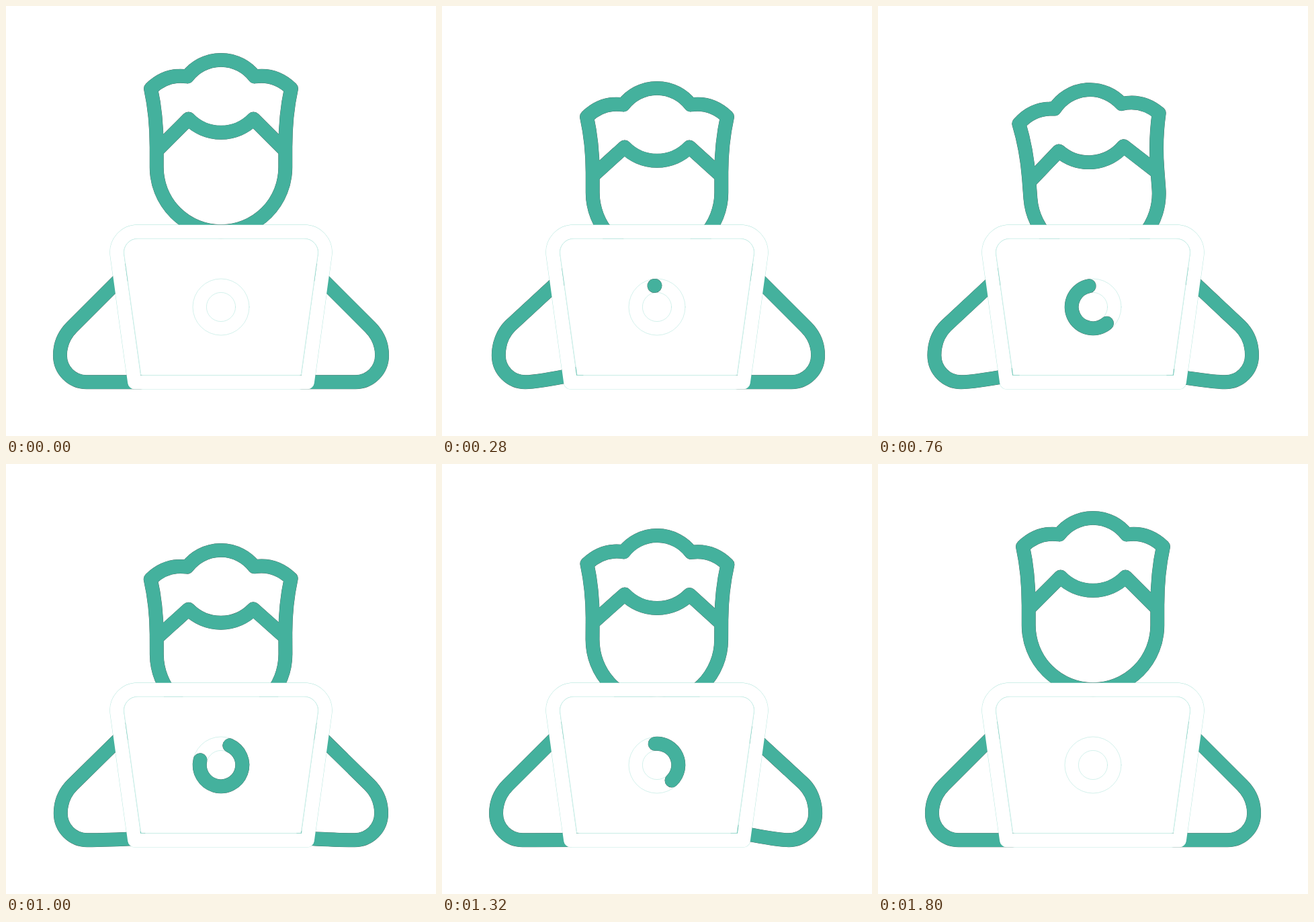
Write an HTML page that moves like this. It is 640 px wide and 640 px high and loops after 2000 ms.

```html
<!DOCTYPE html>
<html lang="en">
<head>
<meta charset="utf-8">
<title>Typing at a laptop</title>
<style>
  html, body { margin: 0; width: 100%; height: 100%; overflow: hidden; background: #fff; }
  svg { display: block; width: 100%; height: 100%; }
  path, circle { fill: none; stroke-linecap: round; stroke-linejoin: round; }
  .edge { stroke: #4b5c58; stroke-width: 20.9; }
  .line { stroke: #44b19d; stroke-width: 20.4; }
  .hair { stroke: #a9e2d8; stroke-width: 21.1; }
  .thin { stroke: #a9e2d8; stroke-width: .5; }
  .cover { fill: #fff; stroke: #fff; stroke-width: 20.3; }
  .inner { fill: #fff; stroke: #a9e2d8; stroke-width: .5; stroke-linejoin: miter; }
</style>
</head>
<body>
<svg viewBox="0 0 640 640">
  <defs>
    <path id="case" d="M191.3 560L165.3 371.2A31 31 0 0 1 196 335.8H444A31 31 0 0 1 474.7 371.2L448.7 560Z"/>
    <path id="head"/>
    <path id="left"/>
    <path id="right"/>
    <path id="arc"/>
  </defs>
  <use href="#case" class="hair"/>
  <g id="skull">
    <use href="#head" class="edge"/>
    <use href="#head" class="line"/>
  </g>
  <use href="#left" class="edge"/>
  <use href="#left" class="line"/>
  <g transform="matrix(-1 0 0 1 640 0)">
    <use href="#right" class="edge"/>
    <use href="#right" class="line"/>
  </g>
  <use href="#case" class="cover"/>
  <path class="inner" d="M201 549.3L175.7 369.5A20.5 20.5 0 0 1 196 346.3H444A20.5 20.5 0 0 1 464.3 369.5L439 549.3Z"/>
  <circle class="thin" cx="320" cy="448" r="42"/>
  <circle class="thin" cx="320" cy="448" r="21.6"/>
  <use href="#arc" class="edge"/>
  <use href="#arc" class="line"/>
</svg>
<script>
  const LOOP = 2000, STEP = 40, LAST = 1800;
  const $ = id => document.getElementById(id);

  // Each key is [time, value, ease-out strength].
  const tracks = {
    drop: [[40, 0], [280, 42], [600, 42], [1000, 48], [1800, 0, .468]],
    lag: [[40, 0], [280, 4.5], [1240, 5], [1800, 0]],
    tilt: [[560, 0], [780, -4.4], [1140, 1.9], [1380, 0]],
    left: [[40, 0], [280, 1], [480, 0], [600, 0], [800, 1], [1090, 0], [1300, 0], [1500, 1], [1740, 0]],
    right: [[280, 0], [480, 1], [620, 0], [820, 1], [1090, 0], [1320, 1], [1560, 0]],
    tip: [[240, 0], [1160, 1]],
    tail: [[680, 0], [1800, 1]]
  };

  // cubic-bezier(1/3, 0, a, 1)
  function ease(x, a = 2 / 3) {
    let lo = 0, hi = 1;
    for (let i = 0; i < 24; i++) {
      const s = (lo + hi) / 2, r = 1 - s;
      if (r * r * s + 3 * r * s * s * a + s * s * s < x) lo = s; else hi = s;
    }
    return lo * lo * (3 - 2 * lo);
  }

  function at(name, t) {
    const keys = tracks[name];
    if (t <= keys[0][0]) return keys[0][1];
    for (let i = 1; i < keys.length; i++) {
      const [t0, v0] = keys[i - 1], [t1, v1, a] = keys[i];
      if (t < t1) return v0 + (v1 - v0) * ease((t - t0) / (t1 - t0), a);
    }
    return keys[keys.length - 1][1];
  }

  function headPath(lag) {
    const side = 210 - lag, jaw = 240 - lag, fringe = 215.5 - lag;
    return `M270 105A63 63 0 0 1 370 105C390 102 409 108 424.5 123
      C419 148 415.8 178 415.8 ${side}V${jaw}A95.8 95.8 0 0 1 224.2 ${jaw}V${side}
      C224.2 178 221 148 215.5 123C231 108 250 102 270 105Z
      M224.2 ${fringe}L271.7 168A67.6 67.6 0 0 0 368.3 168L415.8 ${fringe}`;
  }

  const restArm = [200, 376, 98, 478, 87, 489, 80.4, 504, 80.4, 520,
    80.4, 542, 98, 559.8, 120, 559.8, 146, 559.8, 170, 559.8, 200, 559.8];
  const bentArm = [200, 385, 101.5, 476, 90.5, 487, 84.3, 503, 84.3, 520,
    84.3, 542, 102, 559.8, 124, 559.8, 140, 559.8, 165, 555, 200, 548];

  function armPath(k) {
    const p = restArm.map((v, i) => v + (bentArm[i] - v) * k);
    return `M${p.slice(0, 2)}L${p.slice(2, 4)}C${p.slice(4)}`;
  }

  // Runs counter-clockwise from just left of the top.
  function arcPath(from, to) {
    const span = (to - from) * 360;
    if (span < .3) return '';
    const point = f => {
      const a = (5.3 + f * 360) * Math.PI / 180;
      return `${320 - 31.8 * Math.sin(a)} ${448 - 31.8 * Math.cos(a)}`;
    };
    return `M${point(from)}A31.8 31.8 0 ${span > 180 ? 1 : 0} 0 ${point(to)}`;
  }

  function draw(now) {
    let t = Math.min(Math.floor((now % LOOP) / STEP) * STEP, LAST);
    if (t < 2 * STEP) t = 0;
    $('skull').setAttribute('transform',
      `translate(0 ${at('drop', t)}) rotate(${at('tilt', t)} 320 203)`);
    $('head').setAttribute('d', headPath(at('lag', t)));
    $('left').setAttribute('d', armPath(at('left', t)));
    $('right').setAttribute('d', armPath(at('right', t)));
    $('arc').setAttribute('d', arcPath(at('tail', t), at('tip', t)));
  }

  const start = performance.now();
  function tick() {
    draw(performance.now() - start);
    requestAnimationFrame(tick);
  }
  tick();
</script>
</body>
</html>
```
